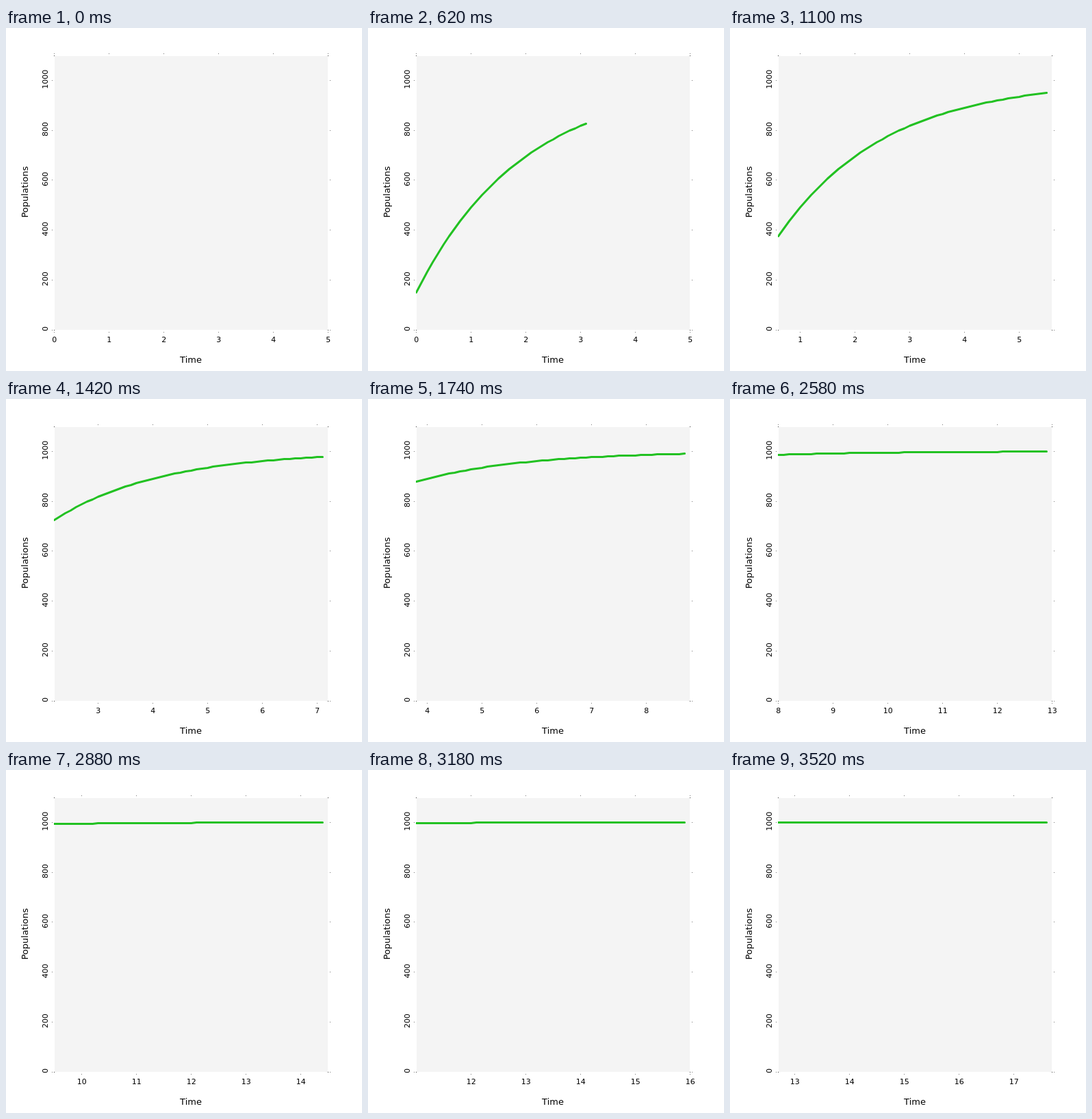
Animation, 520 px wide and 500 px high, one loop 3.54 s. Source, as an HTML page with a canvas:

```html
<!DOCTYPE html>
<html lang="en">
<head>
<meta charset="utf-8">
<title>Population growth</title>
<style>
  html, body { margin: 0; width: 100%; height: 100%; overflow: hidden; background: #fff; }
  canvas { display: block; }
</style>
</head>
<body>
<canvas id="stage" width="520" height="500"></canvas>
<script>
const ctx = document.getElementById('stage').getContext('2d');

const LOOP = 3540, STEP = 20;
const PANEL = { left: 71, top: 41, right: 470, bottom: 440 };
const ORIGIN_X = 70.5, UNIT_X = 80;
const Y_MAX = 1100, PLOT_HEIGHT = 400;
const WINDOW = 49;            // steps of history kept in view
const FONT = '"DejaVu Sans", sans-serif';

// Saturating growth towards 1000, starting at 150.
const population = step => 1000 - 850 * Math.pow(0.95, step);
const yOf = value => PANEL.bottom - value / Y_MAX * PLOT_HEIGHT;

function label(text, x, y, size, vertical) {
  ctx.save();
  ctx.translate(x, y);
  if (vertical) ctx.rotate(-Math.PI / 2);
  ctx.font = `${size}px ${FONT}`;
  ctx.textAlign = 'center';
  ctx.fillStyle = '#000';
  ctx.fillText(text, 0, 0);
  ctx.restore();
}

function dot(x, y, color = '#777') {
  ctx.fillStyle = color;
  ctx.fillRect(Math.floor(x), Math.floor(y), 1, 1);
}

function drawPanel() {
  ctx.fillStyle = '#fff';
  ctx.fillRect(0, 0, 520, 500);
  ctx.fillStyle = '#f4f4f4';
  ctx.fillRect(PANEL.left, PANEL.top, PANEL.right - PANEL.left, PANEL.bottom - PANEL.top);
  for (const x of [70, 470]) {
    for (const y of [40, 440]) dot(x, y, '#333');
  }
}

function drawAxes(first) {
  for (let value = 0; value <= 1000; value += 200) {
    const y = yOf(value);
    dot(67, y);
    dot(473, y);
    label(value, 61, y - 1.5, 11, true);
  }
  for (let tick = Math.ceil(first / 10); tick * 10 <= first + 50; tick++) {
    // Late in the run the tick on the left edge falls just out of range.
    if (tick * 10 === first && tick >= 11) continue;
    const x = ORIGIN_X + (tick - first / 10) * UNIT_X;
    dot(x, 37);
    dot(x, 443);
    label(tick, x + 0.3, 458, 11);
  }
  label('Time', 270, 488, 13);
  label('Populations', 32, 239, 13, true);
}

function drawCurve(first, last) {
  if (last === first) return;
  ctx.save();
  ctx.beginPath();
  ctx.rect(70, 40, 401, 401);
  ctx.clip();
  ctx.beginPath();
  for (let step = first; step <= last; step++) {
    const x = ORIGIN_X + (step - first) * UNIT_X / 10;
    const y = Math.floor(yOf(population(step))) + 0.5;
    ctx.lineTo(x, y);
  }
  ctx.strokeStyle = '#22c122';
  ctx.lineWidth = 3;
  ctx.lineCap = ctx.lineJoin = 'round';
  ctx.stroke();
  ctx.restore();
}

function render(now) {
  const last = Math.floor((now % LOOP) / STEP);
  const first = Math.max(0, last - WINDOW);
  drawPanel();
  drawAxes(first);
  drawCurve(first, last);
}

function loop() {
  render(performance.now());
  requestAnimationFrame(loop);
}
loop();
</script>
</body>
</html>
```
